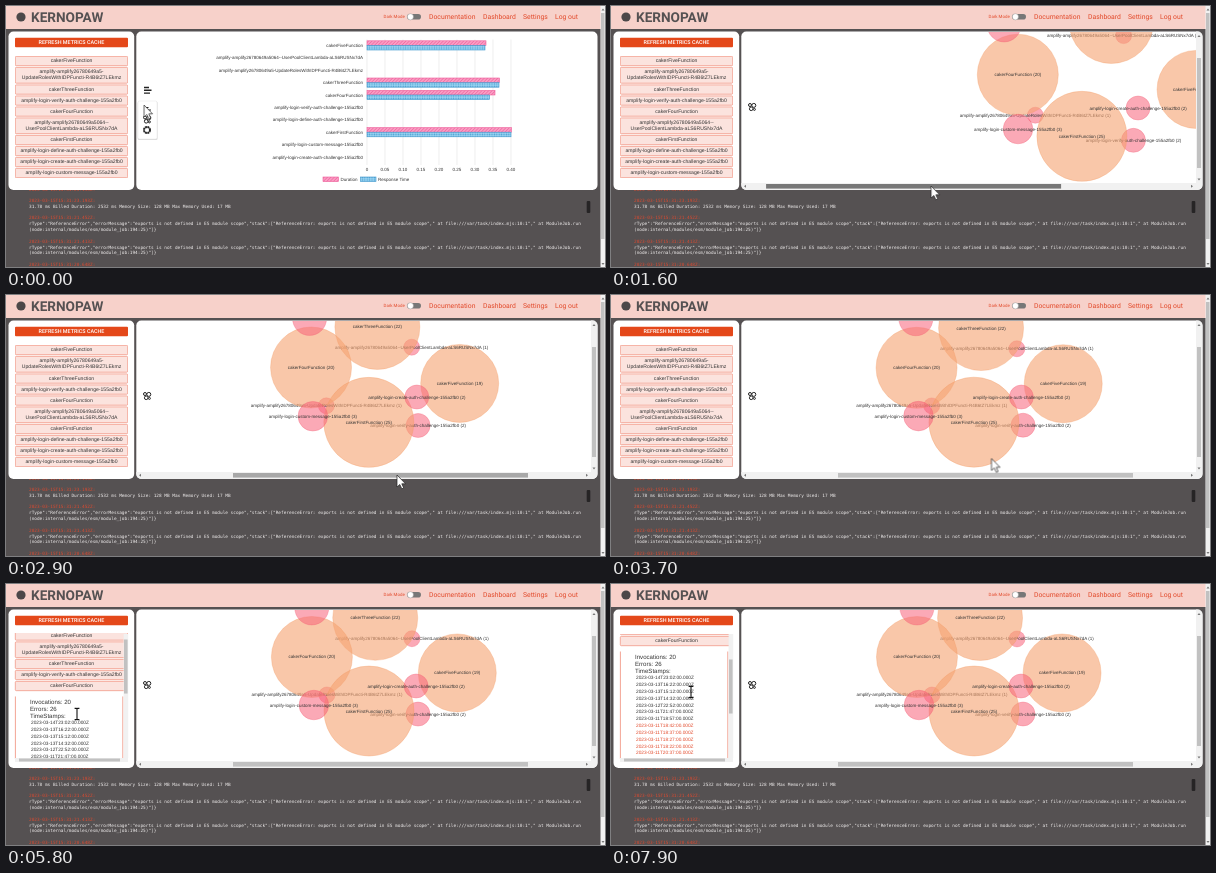
These frames come from a looping animation (599 px wide and 261 px high, 8000 ms). An HTML page:

```html
<!DOCTYPE html>
<html lang="en">
<head>
<meta charset="utf-8">
<title>Function metrics dashboard</title>
<style>
html, body { margin: 0; width: 100%; height: 100%; overflow: hidden; background: #555152; }
svg { display: block; width: 100vw; height: 100vh; }
text { dominant-baseline: central; text-rendering: geometricPrecision; white-space: pre; }
.sans { font: 4.5px "Liberation Sans", Arial, sans-serif; fill: #333; }
.list { font-size: 5.1px; }
.info { font-size: 6.1px; }
.date { font-size: 4.75px; }
.late { fill: #e2492a; }
.nav { font: 6.8px Roboto, sans-serif; fill: #e2492a; }
.mid { text-anchor: middle; }
.end { text-anchor: end; }
.mono { font: 4.41px "DejaVu Sans Mono", monospace; fill: #f2efef; }
.stamp { fill: #dc4a30; }
.thumb { fill: #c1c1c1; }
.track { fill: #f1f1f1; }
.arrow { fill: #777; }
.anim { animation: 8s linear infinite; }
#chart { animation-name: chart; }
#bubbles { animation-name: bubbles; }
#scroll { animation-name: scroll; }
#hthumb { animation-name: hthumb, press; }
#pointer { animation-name: move; }
#arrowCur { animation-name: early; }
#beamCur { animation-name: late; }
#tip { animation-name: tip; }
#tail { animation-name: closed; }
#detail, #bars { animation-name: open; }
#rows { animation-name: rows; }
#vthumb { animation-name: vthumb; }
@keyframes chart { 0%, 3.99% { visibility: visible } 4%, 100% { visibility: hidden } }
@keyframes bubbles { 0%, 3.99% { visibility: hidden } 4%, 100% { visibility: visible } }
@keyframes closed { 0%, 67.9% { visibility: visible } 68%, 100% { visibility: hidden } }
@keyframes open { 0%, 67.9% { visibility: hidden } 68%, 100% { visibility: visible } }
@keyframes early { 0%, 69.9% { visibility: visible } 70%, 100% { visibility: hidden } }
@keyframes late { 0%, 69.9% { visibility: hidden } 70%, 100% { visibility: visible } }
@keyframes tip { 0%, 54% { opacity: 0 } 55%, 60% { opacity: .75 } 61%, 100% { opacity: 0 } }
@keyframes press {
  0%, 17% { fill: #c1c1c1 } 17.5%, 34% { fill: #787878 }
  34.5%, 45% { fill: #a8a8a8 } 45.5%, 100% { fill: #c1c1c1 }
}
@keyframes scroll {
  0%, 17.5% { transform: translateX(0) } 26.25% { transform: translateX(-96px) }
  34%, 100% { transform: translateX(-137px) }
}
@keyframes hthumb {
  0%, 17.5% { transform: translateX(0) } 26.25% { transform: translateX(63px) }
  34%, 100% { transform: translateX(90px) }
}
@keyframes move {
  0% { transform: translate(138px, 99px) } 3%, 4.5% { transform: translate(140px, 110px) }
  12.5% { transform: translate(206px, 188.5px) } 16%, 17.5% { transform: translate(302px, 180px) }
  26.25% { transform: translate(365px, 180px) } 34%, 45% { transform: translate(391px, 180px) }
  54%, 60% { transform: translate(316px, 62px) } 66%, 68.5% { transform: translate(68px, 105px) }
  72.5%, 78% { transform: translate(71px, 130px) } 90%, 100% { transform: translate(80px, 108px) }
}
@keyframes rows {
  0%, 70.5% { transform: translateY(0) } 72.5% { transform: translateY(-3.5px) }
  86%, 100% { transform: translateY(-48.5px) }
}
@keyframes vthumb {
  0%, 70.5% { transform: translateY(0) } 72.5% { transform: translateY(1.5px) }
  86%, 100% { transform: translateY(21.5px) }
}
</style>
</head>
<body>
<svg viewBox="0 0 599 261" preserveAspectRatio="none">
  <defs>
    <clipPath id="clipMain"><rect x="131" y="26" width="454" height="151"/></clipPath>
    <clipPath id="clipList"><rect x="8" y="49.5" width="115" height="125"/></clipPath>
    <clipPath id="clipPanel"><rect x="130.3" y="25.6" width="461.2" height="158.4" rx="5"/></clipPath>
    <pattern id="pink" width="2.4" height="2.4" patternUnits="userSpaceOnUse" patternTransform="rotate(45)">
      <rect width="2.4" height="2.4" fill="#fb9cc3"/><rect width=".7" height="2.4" fill="#ee6ba2"/>
    </pattern>
    <pattern id="blue" width="2.4" height="2.4" patternUnits="userSpaceOnUse">
      <rect width="2.4" height="2.4" fill="#9ad5f3"/><circle cx="1.2" cy="1.2" r=".75" fill="#4d9fd0"/>
    </pattern>
  </defs>

  <rect width="599" height="261" fill="#555152"/>
  <g id="log"></g>
  <rect x="580.7" y="195" width="3.6" height="12" rx="1" fill="#262425"/>

  <rect width="595" height="23" fill="#f7d1ca"/>
  <circle cx="15" cy="11" r="4.6" fill="#4c4849"/>
  <text x="25" y="11.6" style="font: 700 13.6px Roboto, sans-serif" fill="#555152">KERNOPAW</text>
  <text class="nav" x="377.5" y="11" style="font-size:4.4px">Dark Mode</text>
  <rect x="401" y="8" width="14" height="5.6" rx="2.8" fill="#777"/>
  <circle cx="404.4" cy="10.8" r="3.1" fill="#fff" stroke="#888" stroke-width=".4"/>
  <g id="nav" class="nav"></g>
  <rect x="594.5" width="4.5" height="261" class="track"/>
  <rect x="595" y="7" width="3.5" height="226" class="thumb"/>
  <path class="arrow" d="M595.5 4.5h3l-1.5-2zM595.5 257h3l-1.5 2z"/>

  <rect x="2.5" y="25.6" width="125.7" height="158.4" rx="5" fill="#fff"/>
  <rect x="9" y="31.8" width="113" height="9.4" rx="1" fill="#e4481a"/>
  <text class="mid" x="65.5" y="36.7" fill="#fff" style="font: 500 5.4px Roboto, sans-serif">REFRESH METRICS CACHE</text>
  <g clip-path="url(#clipList)">
    <g id="rows" class="anim">
      <g id="head"></g>
      <g id="tail" class="anim"></g>
      <g id="detail" class="anim"><path d="M9.4 116V420M116.8 116V420" stroke="#ee7f68" stroke-width=".7"/></g>
    </g>
  </g>
  <g id="bars" class="anim">
    <rect x="117.6" y="50" width="4.6" height="124" class="track"/>
    <rect x="9" y="174" width="113" height="4" class="track"/>
    <rect x="13" y="174.5" width="101" height="3" class="thumb"/>
    <rect id="vthumb" class="anim thumb" x="118" y="54" width="3.6" height="54"/>
  </g>

  <rect x="130.3" y="25.6" width="461.2" height="158.4" rx="5" fill="#fff"/>
  <g id="chart" class="anim"></g>
  <g id="bubbles" class="anim">
    <g clip-path="url(#clipMain)"><g id="scroll" class="anim"></g></g>
    <g clip-path="url(#clipPanel)">
      <rect x="585" y="25" width="7" height="159" class="track"/>
      <rect x="130" y="177" width="462" height="7" class="track"/>
      <rect x="586" y="52" width="4" height="110" class="thumb"/>
      <path class="arrow" d="M586.5 31h3l-1.5-2zM586.5 172.5h3l-1.5 2zM135 178.8v3l-2-1.5zM580 178.8v3l2-1.5z"/>
      <rect id="hthumb" class="anim" x="137" y="178" width="295" height="4.6"/>
    </g>
    <g id="mode" transform="translate(141 101)"></g>
    <text id="tip" class="anim sans" x="320" y="57" style="fill:#fff">cakerFourFunction</text>
  </g>

  <g id="pointer" class="anim">
    <path id="arrowCur" class="anim" d="M0 0V12L2.8 9.5 4.8 13.8 6.7 13 4.8 8.8H8.5Z" fill="#fff" stroke="#222" stroke-width=".7"/>
    <path id="beamCur" class="anim" d="M-2.4-5.6H-.6L0-5 .6-5.6H2.4M0-5V5M-2.4 5.6H-.6L0 5 .6 5.6H2.4" fill="none" stroke="#111" stroke-width="1.1"/>
  </g>
</svg>
<script>
const $ = id => document.getElementById(id);

function add(parent, tag, attrs, content) {
  const el = document.createElementNS('http://www.w3.org/2000/svg', tag);
  for (const key in attrs) el.setAttribute(key, attrs[key]);
  if (content) el.textContent = content;
  return parent.appendChild(el);
}
const label = (parent, x, y, content, cls) => add(parent, 'text', { x, y, class: cls }, content);

const AMP = 'amplify-amplify26780649a5';
const POOL = 'UserPoolClientLambda-aLS6RUSNx7dA';
const ROLES = 'UpdateRolesWithIDPFuncti-R4B6tZ7LEkmz';
const login = kind => `amplify-login-${kind}-155a2fb0`;
const VERIFY = login('verify-auth-challenge');
const DEFINE = login('define-auth-challenge');
const CREATE = login('create-auth-challenge');
const CUSTOM = login('custom-message');
const caker = n => `caker${n}Function`;

// header links
[['Documentation', 423], ['Dashboard', 477], ['Settings', 517], ['Log out', 549]]
  .forEach(([word, x]) => label($('nav'), x, 11, word, 'nav'));

// terminal log
const scope = 'exports is not defined in ES module scope';
const fault = `rType":"ReferenceError","errorMessage":"${scope}","stack":["ReferenceError: ${scope}"," at file:///var/task/index.mjs:10:1"," at ModuleJob.run`;
const trace = '(node:internal/modules/esm/module_job:194:25)"]}';
const stamp = time => `2023-03-15T${time}Z:`;
[
  [184, stamp('15:31:23.193')], [195.3, stamp('15:31:23.193')],
  [201.3, '31.78 ms Billed Duration: 2532 ms Memory Size: 128 MB Max Memory Used: 17 MB'],
  [212.5, stamp('15:31:21.452')], [218.5, fault], [224.3, trace],
  [236, stamp('15:31:21.413')], [242, fault], [247.8, trace],
  [259.4, stamp('15:31:20.648')]
].forEach(([y, line]) => label($('log'), 23, y, line, line.startsWith('2023') ? 'mono stamp' : 'mono'));

// function list
let rowTop = 50.4;
[
  [caker('Five')], [AMP + '-', ROLES], [caker('Three')], [VERIFY], [caker('Four')],
  [AMP + '064--', POOL], [caker('First')], [DEFINE], [CREATE], [CUSTOM]
].forEach((lines, i) => {
  const group = i < 5 ? $('head') : $('tail');
  const height = lines.length > 1 ? 15.8 : 9.3;
  add(group, 'rect', { x: 9.3, y: rowTop, width: 112.4, height, rx: 1, fill: '#fbe3de', stroke: '#ee7f68', 'stroke-width': .6 });
  lines.forEach((line, j) =>
    label(group, 65.5, rowTop + height / 2 + (j - (lines.length - 1) / 2) * 6.2, line, 'sans list mid'));
  rowTop += height + 1.7;
});

// expanded details
['Invocations: 20', 'Errors: 26', 'TimeStamps:']
  .forEach((line, i) => label($('detail'), 24, 121.8 + i * 7.2, line, 'sans info'));
['14T23:02', '13T16:22', '13T15:12', '13T14:32', '12T22:52', '11T21:47', '11T18:57',
  '11T18:42', '11T18:37', '11T18:27', '11T18:22', '11T20:37']
  .forEach((time, i) =>
    label($('detail'), 25, 143.2 + i * 6.83, `2023-03-${time}:00.000Z`, i < 7 ? 'sans date' : 'sans date late'));

// bar chart
const chart = $('chart');
for (let i = 0; i <= 8; i++) {
  const x = 361 + i * 18;
  add(chart, 'path', { d: `M${x} 33.5V159`, stroke: '#e3e3e3', 'stroke-width': .6 });
  label(chart, x, 163.3, i ? (i * .05).toFixed(2) : '0', 'sans mid');
}
const bar = (x, y, w, h, kind) => add(chart, 'rect', {
  x, y, width: w, height: h, fill: `url(#${kind})`, stroke: kind === 'pink' ? '#ee5f9b' : '#3f96cb', 'stroke-width': .6
});
[
  [caker('Five'), 119, 118], [`${AMP}064--${POOL}`], [`${AMP}-${ROLES}`], [caker('Three'), 132.5, 132],
  [caker('Four'), 128, 122.5], [VERIFY], [DEFINE], [caker('First'), 144.5, 144], [CUSTOM], [CREATE]
].forEach(([name, duration, response], i) => {
  const y = 39.4 + i * 12.4;
  label(chart, 357, y, name, 'sans end');
  if (!duration) return;
  bar(361, y - 4.6, duration, 4.6, 'pink');
  bar(361, y, response, 4.6, 'blue');
});
bar(317, 171, 15.5, 4.6, 'pink');
label(chart, 334.5, 173.5, 'Duration', 'sans');
bar(354.5, 171, 15.5, 4.6, 'blue');
label(chart, 372, 173.5, 'Response Time', 'sans');

// chart type menu
add(chart, 'path', { d: 'M138 81.5h5M138 84.3h7.5M138 87.1h6', stroke: '#222', 'stroke-width': 1.4 });
add(chart, 'rect', { x: 131.6, y: 95.6, width: 20, height: 38.4, rx: 1.5, fill: '#ddd' });
add(chart, 'rect', { x: 132, y: 95, width: 19, height: 38, rx: 1.5, fill: '#fff', stroke: '#ddd', 'stroke-width': .4 });
add(chart, 'path', { d: 'M138.5 101.5h4M138.5 104h6.5M138.5 106.5h5', stroke: '#222', 'stroke-width': 1.2 });
function bubbleIcon(parent) {
  [[-2, -2, 1.5], [1.8, -1.6, 2], [-.8, 1.8, 1.8], [2.4, 2.4, 1]].forEach(([cx, cy, r]) =>
    add(parent, 'circle', { cx, cy, r, fill: '#fff', stroke: '#222', 'stroke-width': 1 }));
}
bubbleIcon(add(chart, 'g', { transform: 'translate(141 113.5)' }));
bubbleIcon($('mode'));
add(chart, 'circle', { cx: 141, cy: 124, r: 3, fill: 'none', stroke: '#222', 'stroke-width': 2, 'stroke-dasharray': '1.9 .46' });

// bubbles: name, count, radius, resting x y, early x y
const nodes = [
  [caker('Five'), 19, 39, 588, 89, 685, 67],
  [`${AMP}064--${POOL}`, 1, 8, 543, 55, 532, -45],
  [`${AMP}-${ROLES}`, 1, 8, 458, 111, 434, 104],
  [caker('Three'), 22, 42.5, 506, 34, 592, -41],
  [caker('Four'), 20, 40.5, 443, 73, 409, 56],
  [VERIFY, 2, 12, 549, 130, 553, 147],
  [DEFINE, 3, 17, 443, 24, 355, 4],
  [caker('First'), 25, 45, 500, 127, 494, 140],
  [CUSTOM, 3, 14.8, 445, 121, 404, 129],
  [CREATE, 2, 12, 547, 102, 577, 102]
].map(([name, count, r, x, y, x0, y0]) => {
  const g = add($('scroll'), 'g', {});
  const big = r > 30;
  add(g, 'circle', {
    r, fill: big ? '#f6a271' : '#f7637a', 'fill-opacity': big ? .6 : .55,
    stroke: big ? '#f0965f' : '#f0596f', 'stroke-opacity': .5, 'stroke-width': .6
  });
  label(g, 0, 0, `${name} (${count})`, 'sans mid');
  return { g, x, y, dx: x0 - x, dy: y0 - y };
});

// layout settles fast at first, then slowly
function draw() {
  const age = performance.now() % 8000 - 1000;
  const k = Math.min(1.8, .93 * Math.exp(-age / 400) + .07 * Math.exp(-age / 1500));
  for (const n of nodes) n.g.setAttribute('transform', `translate(${n.x + n.dx * k} ${n.y + n.dy * k})`);
  requestAnimationFrame(draw);
}
draw();
</script>
</body>
</html>
```
